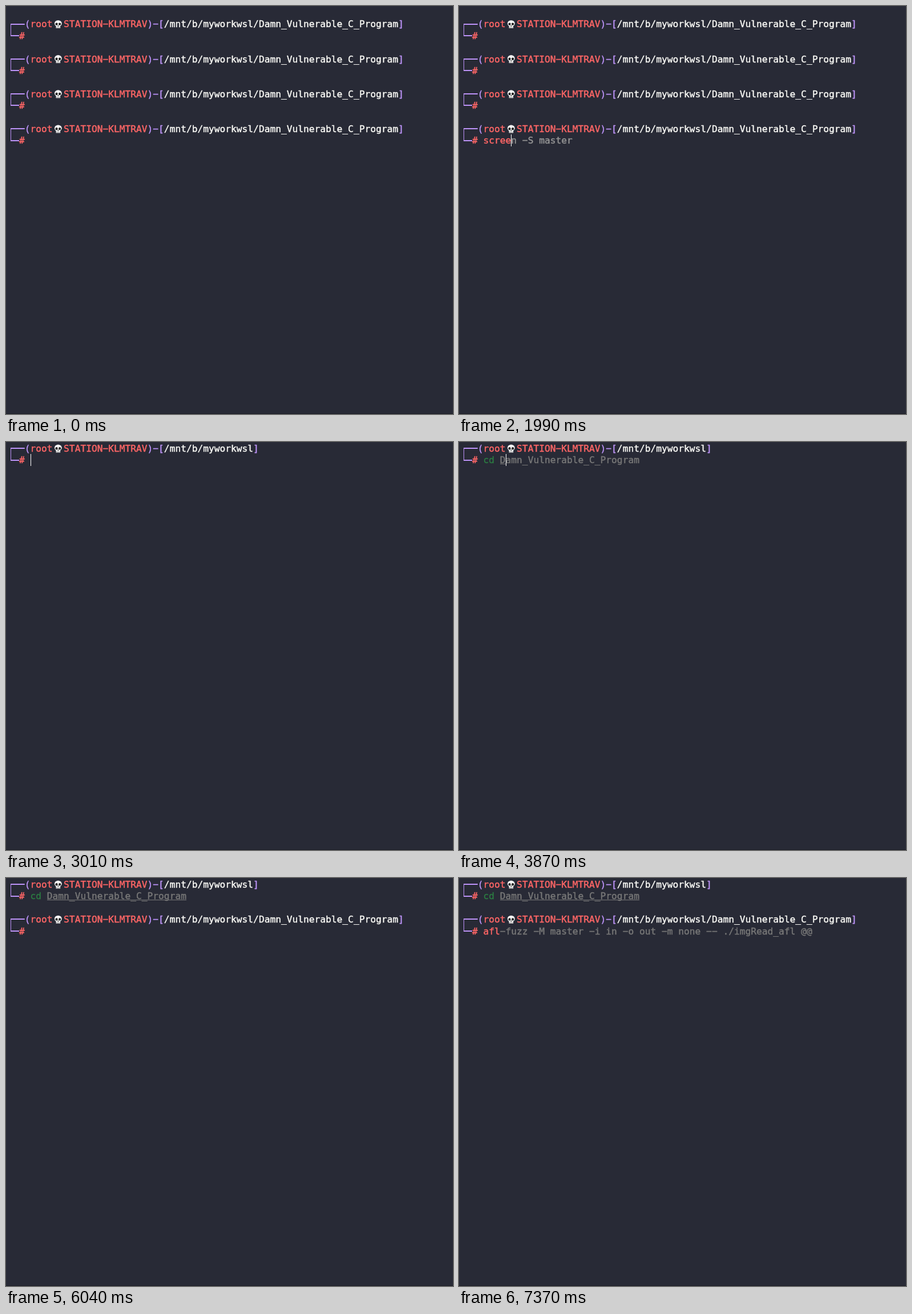
An HTML page with a canvas that plays this animation: 783x715 px, repeating every 8 s.

```html
<!DOCTYPE html>
<html lang="en">
<head>
<meta charset="utf-8">
<title>Terminal session</title>
<style>
  html, body { margin: 0; width: 100%; height: 100%; overflow: hidden; background: #282a36; }
  canvas { display: block; }
</style>
</head>
<body>
<canvas id="screen" width="783" height="715"></canvas>
<script>
const ctx = document.getElementById('screen').getContext('2d');
const LOOP = 8000;
const CELL_W = 9.765, CELL_H = 20.4, LEFT = 3.45, TOP = 1;
const BACK = '#282a36', PURPLE = '#bd93f9', RED = '#ff6666', WHITE = '#f8f8f4',
      GREEN = '#50fa7b', PINK = '#d87abf', GREY = '#949494',
      DIM_GREY = '#777777', DIM_GREEN = '#2c7a42', DIM_RED = '#94474c';
const HOST = 'STATION-KLMTRAV';
const HOME = '/mnt/b/myworkwsl', FOLDER = 'Damn_Vulnerable_C_Program';
const FUZZ = 'afl-fuzz -M master -i in -o out -m none -- ./imgRead_afl @@';

const colX = col => LEFT + col * CELL_W;
const rowY = row => TOP + row * CELL_H;

function box(x, y, w, h, color) {
  ctx.fillStyle = color;
  ctx.fillRect(x, y, w, h);
}

// Writes text on the character grid and returns the next free column.
function put(row, col, text, color) {
  ctx.font = '16.2px "DejaVu Sans Mono", monospace';
  ctx.fillStyle = ctx.strokeStyle = color;
  ctx.lineWidth = 0.45;
  ctx.lineJoin = 'round';
  const baseline = Math.round(rowY(row) + 16);
  for (const char of text) {
    // The terminal's hyphen is wide, like a minus sign.
    const glyph = char === '-' ? '\u2212' : char;
    ctx.fillText(glyph, colX(col), baseline);
    ctx.strokeText(glyph, colX(col), baseline);
    col++;
  }
  return col;
}

function cursor(row, col) {
  box(Math.round(colX(col)), Math.floor(rowY(row)), 1, 21, '#ffffff');
}

function underline(row, col, length) {
  const x = Math.round(colX(col));
  box(x, Math.round(rowY(row) + 17), Math.round(colX(col + length)) - x, 1, DIM_GREY);
}

function ellipse(x, y, rx, ry, color) {
  ctx.fillStyle = color;
  ctx.beginPath();
  ctx.ellipse(x, y, rx, ry, 0, 0, Math.PI * 2);
  ctx.fill();
}

function skull(x, y) {
  ellipse(x, y - 1.3, 6.4, 5.7, '#f4f4f4');
  box(x - 3.7, y + 2, 7.4, 5, '#f4f4f4');
  for (const side of [-1, 1]) {
    ellipse(x + side * 2.8, y - 0.3, 2, 2.2, '#111111');
    box(x + side * 1.5 - 0.4, y + 4.6, 0.8, 2.4, '#444444');
  }
  ellipse(x, y + 2.8, 0.8, 1, '#111111');
}

function prompt(row, path) {
  const x = Math.floor(colX(0.5));
  const y = rowY(row + 0.5), top = Math.round(y) - 1, bottom = Math.round(y + CELL_H) - 1;
  box(x, top, colX(3) - x, 2, PURPLE);
  box(x, top, 1, bottom - top, PURPLE);
  box(x, bottom, colX(2) - x, 2, PURPLE);

  put(row, 3, '(', PURPLE);
  put(row, 4, 'root', RED);
  skull(colX(9), y + 0.3);
  let col = put(row, 10, HOST, RED);
  col = put(row, col, ')-[', PURPLE);
  col = put(row, col, path, WHITE);
  put(row, col, ']', PURPLE);
  put(row + 1, 2, '#', RED);
}

function pointer() {
  box(367, 303, 1, 15, WHITE);
  for (const y of [302, 318]) {
    box(363, y, 4, 1, WHITE);
    box(368, y, 4, 1, WHITE);
  }
}

function typing(row, text, count, color, hint) {
  put(row, 4, text.slice(0, count), color);
  put(row, 4 + count, text.slice(count), hint);
}

function firstShell(t) {
  for (const row of [1, 4, 7, 10]) prompt(row, `${HOME}/${FOLDER}`);
  if (t >= 380 && t < 1300) pointer();
  if (t >= 2770) {
    put(11, 4, 'screen', GREEN);
    put(11, 11, '-S', PINK);
    put(11, 14, 'master', WHITE);
    cursor(12, 0);
  } else if (t >= 1300) {
    const count = t < 1680 ? 1 : t < 1990 ? 3 : 5;
    typing(11, 'screen -S master', count, RED, GREY);
    cursor(11, 4 + count);
  } else if (t >= 840) {
    cursor(11, 4);
  }
}

function secondShell(t) {
  prompt(0, HOME);
  if (t < 3870) return cursor(1, 4);

  put(1, 4, 'cd', DIM_GREEN);
  put(1, 7, FOLDER, DIM_GREY);
  underline(1, 7, t < 4800 ? 1 : t < 5430 ? 2 : FOLDER.length);
  if (t < 4800) cursor(1, 8);
  if (t < 5430) return;
  if (t < 6040) return cursor(3, 0);

  prompt(3, `${HOME}/${FOLDER}`);
  if (t >= 7370) {
    typing(4, FUZZ, 3, RED, DIM_GREY);
  } else if (t >= 6660) {
    typing(4, FUZZ, 1, DIM_RED, DIM_GREY);
    cursor(4, 5);
  }
}

const start = performance.now();

function draw() {
  const t = (performance.now() - start) % LOOP;
  box(0, 0, 783, 715, BACK);
  (t < 3010 ? firstShell : secondShell)(t);
  box(0, 714, 783, 1, '#1c1d26');
  requestAnimationFrame(draw);
}
draw();
</script>
</body>
</html>
```
